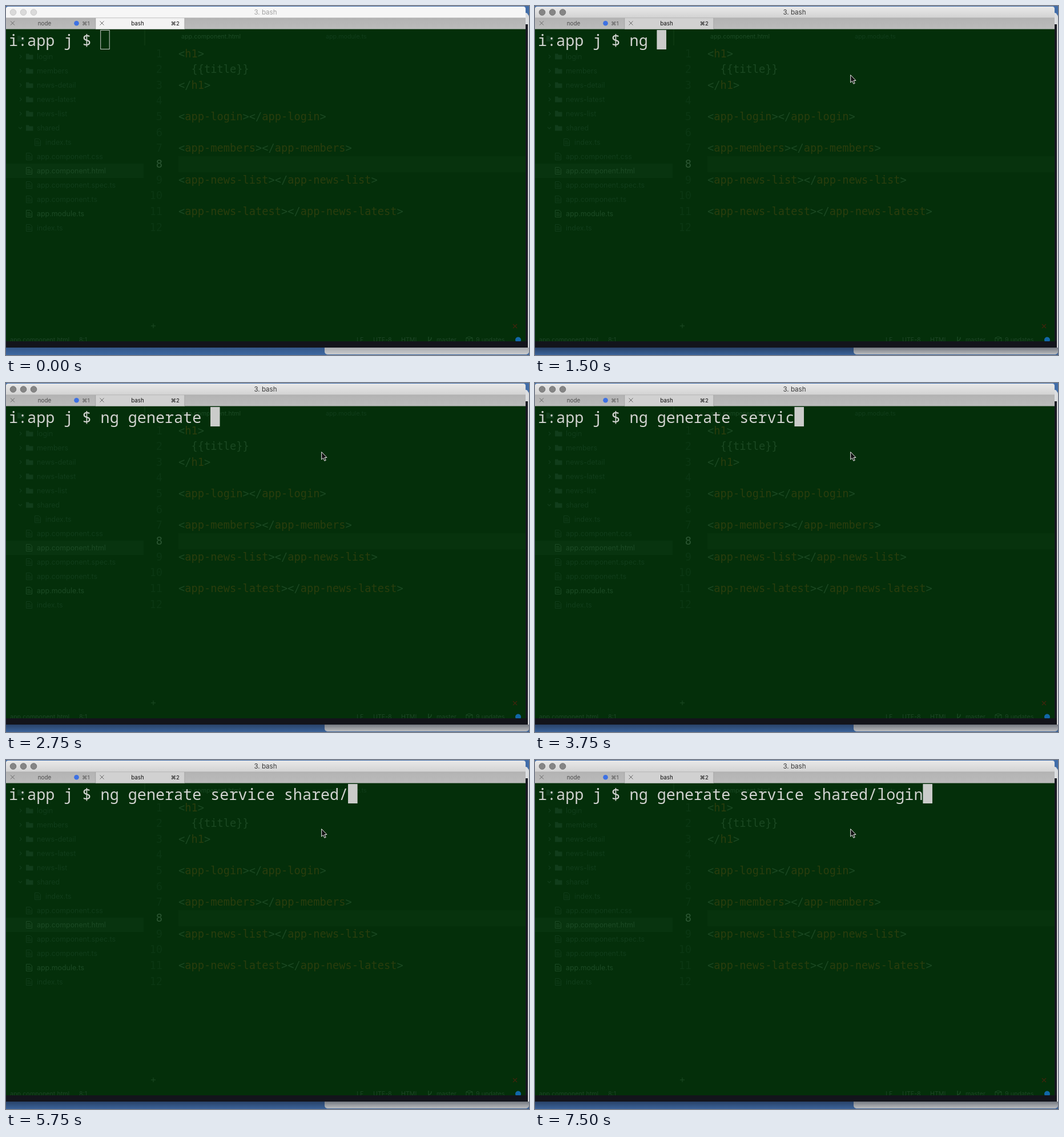
An HTML page that plays this animation: 916x611 px, repeating every 8 s.

```html
<!DOCTYPE html>
<html lang="en">
<head>
<meta charset="utf-8">
<title>Terminal</title>
<style>
html, body { margin: 0; width: 100%; height: 100%; overflow: hidden; background: #3f6ba5; }
svg { display: block; }
text { font-family: Inter, "DejaVu Sans", sans-serif; white-space: pre; }
.code { font: 18.7px "DejaVu Sans Mono", monospace; }
.term { font: 26.78px "Noto Sans Mono", monospace; fill: #d2d3d0; }
</style>
</head>
<body>
<svg id="stage" width="916" height="611" viewBox="0 0 916 611"></svg>
<script>
const LOOP = 8000, CELL = 16.07, LEFT = 5;
const PROMPT = "i:app j $ ", COMMAND = "ng generate service shared/login";
// [time in ms, characters typed]
const KEYS = [[1000, 1], [1500, 3], [1750, 4], [2000, 6], [2250, 8], [2500, 11], [2750, 12],
  [3250, 15], [3500, 16], [3750, 18], [4000, 19], [4250, 20], [4750, 21], [5000, 23],
  [5250, 25], [5500, 26], [5750, 27], [6000, 28], [6250, 29], [6500, 32]];

const rect = (x, y, w, h, fill, more = "") =>
  `<rect x="${x}" y="${y}" width="${w}" height="${h}" fill="${fill}" ${more}/>`;
const line = (d, color, width = 1) =>
  `<path d="${d}" fill="none" stroke="${color}" stroke-width="${width}"/>`;
const esc = s => s.replace(/</g, "&lt;").replace(/>/g, "&gt;");
const text = (x, y, s, size, fill, more = "") =>
  `<text x="${x}" y="${y}" font-size="${size}" fill="${fill}" ${more}>${esc(s)}</text>`;
const fade = (id, from, to) => `<linearGradient id="${id}" x2="0" y2="1">
  <stop stop-color="${from}"/><stop offset="1" stop-color="${to}"/></linearGradient>`;

const DIM = "#113d1b", LIT = "#1c4a25", FAINT = "#0b3713";

function desktop() {
  return rect(0, 0, 916, 611, "#416da9") +
    rect(558, 14, 358, 596, "#d9dadb", 'rx="5"') +
    rect(400, 12, 514, 30, "#dcdee1", 'rx="4"') +
    rect(0, 32, 914, 566, "#171922") +
    rect(0, 598, 916, 13, "url(#shade)", 'id="shadow"') +
    rect(0, 40, 910, 547, "#042f0a");
}

function folder(x, y, open) {
  const chevron = open ? `M${x - 13} ${y - 1.5}l3 3 3-3` : `M${x - 11} ${y - 3}l3 3-3 3`;
  return line(chevron, DIM, 1.3) +
    `<path d="M${x} ${y - 5}h5l1 2h6.500v8H${x}z" fill="${DIM}"/>`;
}

function file(x, y, color) {
  return line(`M${x + .5} ${y - 6}h7l3 3v9h-10zM${x + 2} ${y - 2}h5m-5 2.500h7m-7 2.500h7`, color);
}

function sidebar() {
  let out = rect(0, 276, 241, 25, "#08340f") + folder(20, 57, true);
  ["login", "members", "news-detail", "news-latest", "news-list", "shared"].forEach((name, i) => {
    const y = 88.5 + 25 * i;
    out += folder(35, y, name === "shared") + text(54, y + 4.5, name, 12.4, DIM);
  });
  out += file(50, 238.5, DIM) + text(69, 243, "index.ts", 12.4, DIM);
  ["app.component.css", "app.component.html", "app.component.spec.ts", "app.component.ts",
    "app.module.ts", "index.ts"].forEach((name, i) => {
    const y = 263.5 + 25 * i, color = i === 1 || i === 4 ? LIT : DIM;
    out += file(35, y, color) + text(54, y + 4.5, name, 12.4, color);
  });
  return out;
}

function editor() {
  let out = rect(242.500, 41, 1, 28, "#154019") + rect(302, 263, 608, 28, "#07330d") +
    text(307, 57, "app.component.html", 10.7, LIT) +
    text(560, 57, "app.module.ts", 10.7, DIM);
  const pair = name => `<${name}></${name}>`;
  const lines = ["<h1>", "  {{title}}", "</h1>", "", pair("app-login"), "", pair("app-members"),
    "", pair("app-news-list"), "", pair("app-news-latest"), ""];
  lines.forEach((s, i) => {
    const y = 89.5 + 27.65 * i;
    const spans = s.split(/([\w-]*\w)/).map((part, k) =>
      `<tspan fill="${k % 2 && i !== 1 ? "#2a3d0d" : "#1b4822"}">${esc(part)}</tspan>`).join("");
    out += text(274, y, String(i + 1), 18.7, i === 7 ? "#2b5632" : FAINT,
      'class="code" text-anchor="end"') +
      `<text class="code" x="302" y="${y}">${spans}</text>`;
  });
  return out;
}

function statusBar() {
  const labels = [[7, "app.component.html"], [128, "8:1"], [614, "LF"], [643, "UTF-8"],
    [692, "HTML"], [754, "master"], [823, "9 updates"]];
  return line("M254 560h8m-4-4v8", LIT) + line("M888 557l7 7m0-7l-7 7", "#41240d", 1.3) +
    labels.map(([x, s]) => text(x, 588, s, 10.7, "#1d4526")).join("") +
    line("M740 579v11m0-4q5 0 5-6", LIT, 1.4) +
    line("M806 581l5-2 6 2v6l-6 2-5-2zm0 0l5 2 6-2m-6 2v6", LIT) +
    '<circle cx="897" cy="584.500" r="5" fill="#1267a8"/>' +
    rect(0, 587, 914, 11, "#13141b");
}

function chrome(active) {
  const [title, light, ring, tab, ink, label] = active
    ? ["url(#bar)", "#858585", "#747474", "#d1d1d1", "#393939", "#111"]
    : ["#f6f6f6", "#dadada", "#c9c9c9", "#f3f3f3", "#a2a2a2", "#111"];
  const cross = x => line(`M${x - 3.5} 26.500l7 7m0-7l-7 7`, "#686868");
  return `<path d="M0 21V5q0-4 4-4h902q4 0 4 4v16z" fill="${title}"/>` +
    [12.5, 30.5, 48.5].map(x =>
      `<circle cx="${x}" cy="11" r="5.300" fill="${light}" stroke="${ring}"/>`).join("") +
    text(454.5, 15.2, "3. bash", 11.6, ink, 'text-anchor="middle"') +
    rect(0, 21, 910, 19.5, "url(#tabs)") + rect(157, 21, 156, 19.5, tab) +
    rect(0, 20.5, 910, .7, "#aaa") + rect(156.5, 21, .7, 19, "#999") + rect(312.5, 21, .7, 19, "#999") +
    cross(11.5) + cross(168) +
    text(67.500, 33.7, "node", 9.8, "#4c4c4c", 'text-anchor="middle"') +
    text(230.500, 33.7, "bash", 9.8, label, 'text-anchor="middle"') +
    '<circle cx="123.500" cy="30.300" r="4.300" fill="#3d71e4"/>' +
    text(133, 33.7, "⌘1", 9.6, "#555") + text(288.5, 33.7, "⌘2", 9.6, label);
}

const stage = document.getElementById("stage");
stage.innerHTML = `<defs>${fade("bar", "#e9e9e9", "#d2d2d2")}${fade("tabs", "#b3b3b3", "#bbbbbb")}
  <linearGradient id="shade" x2="0" y2="1"><stop stop-color="#101827" stop-opacity=".5"/>
  <stop offset="1" stop-color="#101827" stop-opacity=".12"/></linearGradient></defs>` +
  desktop() + sidebar() + editor() + statusBar() +
  `<g id="idle">${chrome(false)}</g><g id="active">${chrome(true)}</g>
  <text id="typed" class="term" x="${LEFT}" y="70"></text>
  <rect id="caret" y="42.500" width="15.500" height="33" stroke="#cbccca"/>
  <path id="mouse" d="M552.700 120.700v13.300l3-2.700 2.200 5 2.300-1-2.200-4.800h4z" fill="#111" stroke="#eee"/>`;

const { idle, active, typed, caret, mouse, shadow } =
  Object.fromEntries([...stage.querySelectorAll("[id]")].map(el => [el.id, el]));
const show = (el, on) => el.setAttribute("visibility", on ? "visible" : "hidden");

function draw(now) {
  const t = now % LOOP, focused = t >= 500;
  const count = KEYS.reduce((n, [at, chars]) => t >= at ? chars : n, 0);
  show(idle, !focused);
  show(active, focused);
  show(mouse, t >= 250);
  shadow.setAttribute("opacity", focused ? 1 : .5);
  typed.textContent = PROMPT + COMMAND.slice(0, count);
  caret.setAttribute("x", LEFT + CELL * (PROMPT.length + count));
  caret.setAttribute("fill", focused ? "#cbccca" : "none");
}

const start = performance.now();
function tick() {
  draw(performance.now() - start);
  requestAnimationFrame(tick);
}
tick();
</script>
</body>
</html>
```
